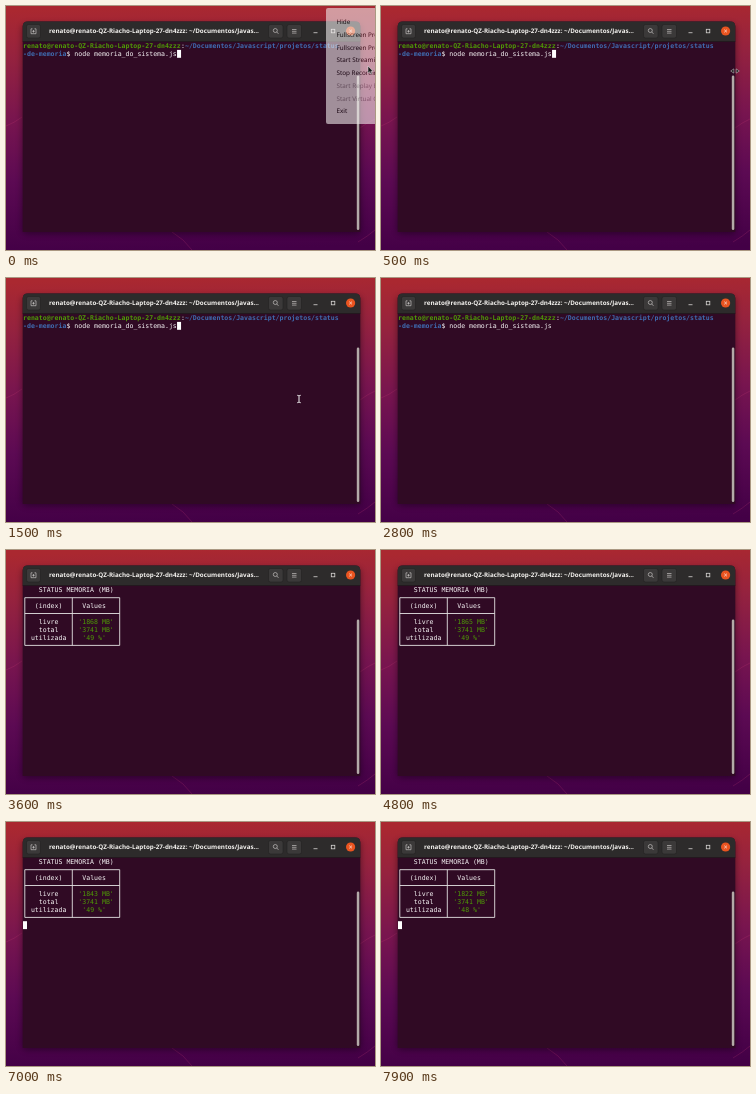
These frames come from a looping animation (369 by 244 pixels, 8000 ms). An HTML page:

```html
<!DOCTYPE html>
<html lang="pt">
<head>
<meta charset="utf-8">
<title>Status da memória</title>
<style>
html, body { margin: 0; width: 100%; height: 100%; overflow: hidden; background: #4a0649; }
svg { display: block; width: 369px; height: 244px; }
text { white-space: pre; text-rendering: geometricPrecision; }
.mono { font: 6.56px "DejaVu Sans Mono", monospace; }
.ui { font-family: "Noto Sans", "Open Sans", sans-serif; }
.b { font-weight: 700; }
</style>
</head>
<body>
<svg viewBox="0 0 369 244">
  <defs>
    <linearGradient id="sky" x1="0.48" y1="0" x2="0.52" y2="1">
      <stop offset="0" stop-color="#aa2830"/>
      <stop offset=".2" stop-color="#94223f"/>
      <stop offset=".45" stop-color="#78154f"/>
      <stop offset=".7" stop-color="#5c0a53"/>
      <stop offset="1" stop-color="#430046"/>
    </linearGradient>
    <filter id="blur" x="-10%" y="-10%" width="120%" height="120%"><feGaussianBlur stdDeviation="3"/></filter>
  </defs>

  <rect width="369" height="244" fill="url(#sky)"/>
  <g fill="none" stroke="#d0407a" stroke-opacity=".2">
    <path d="M0 120Q8 117 16 111M166 226Q178 233 186 244M352 236Q362 230 369 224M354 122Q362 116 369 113"/>
  </g>
  <rect x="16" y="18" width="339" height="210" rx="5" fill="#000" opacity=".38" filter="url(#blur)"/>

  <path d="M16.700 226V20.500q0-5 5-5H349.300q5 0 5 5V226Z" fill="#300a24"/>
  <path d="M16.700 35.500V20.500q0-5 5-5H349.300q5 0 5 5V35.500Z" fill="#2d2b2b"/>
  <path d="M16.700 35.500H354.300" stroke="#1c1918" stroke-width=".6"/>
  <g fill="#3b3939" stroke="#242222" stroke-width=".6">
    <rect x="20.500" y="18.500" width="14" height="13.500" rx="2"/>
    <rect x="262.500" y="18.500" width="14.500" height="13.500" rx="2"/>
    <rect x="281" y="18.500" width="14.500" height="13.500" rx="2"/>
  </g>
  <g fill="none" stroke="#d8d5d3" stroke-width=".6">
    <path d="M26.500 22.800H25V27.700H30V22.800H28.500M27.500 24V26.600M26.200 25.300H28.800"/>
    <circle cx="269.300" cy="24.500" r="2"/><path d="M270.800 26L272.500 27.900"/>
    <path d="M286 23.500H290.500M286 25.300H290.500M286 27.100H290.500"/>
    <path d="M307.500 26.700H311.500" stroke-width=".8"/>
    <rect x="325.300" y="23.300" width="3.500" height="3.500" stroke-width=".8"/>
  </g>
  <circle cx="344.600" cy="25" r="4.600" fill="#e95420"/>
  <path d="M343.200 23.600L346 26.400M346 23.600L343.200 26.400" stroke="#fff" stroke-width=".6"/>
  <text id="title" class="ui b" x="43" y="27.300" font-size="6.260" fill="#f4f2ef"></text>
  <rect x="350.800" y="69.500" width="2.500" height="154.500" rx="1.250" fill="#b3aaa8"/>

  <g id="prompt" class="mono"></g>
  <g id="table" class="mono">
    <path d="M18.800 47.700H113.700V95.400H18.800ZM66.300 47.700V95.400M18.800 63.500H113.700" fill="none" stroke="#e4e2e2" stroke-width=".9"/>
  </g>
  <rect id="caret" width="4" height="7.900" fill="#fff"/>

  <g id="menu" class="ui" font-size="6.300">
    <rect x="320" y="2" width="56" height="116" rx="2" fill="#f3efef"/>
  </g>

  <g id="arrow"><path d="M0 0V7.200L1.700 5.700L2.900 8.200L4 7.700L2.900 5.300H5Z" fill="#151515" stroke="#eee" stroke-width=".5"/></g>
  <g id="resize"><path d="M-4.300 0L-1.200-2.100V2.100ZM4.300 0L1.200-2.100V2.100Z" fill="#151515" stroke="#ddd" stroke-width=".5"/></g>
  <g id="beam"><path d="M-1.700-3.700Q0-3.700 0-2.700Q0-3.700 1.700-3.700M0-2.700V2.700M-1.700 3.700Q0 3.700 0 2.700Q0 3.700 1.700 3.700" fill="none" stroke="#f4f4f4" stroke-width="1"/></g>
</svg>
<script>
const LOOP = 8000, STEP = 100, ENTER = 1800, BLINK = 600;
const COL = 3.95, ROW = 7.9, LEFT = 17;
const GREEN = '#4e9a06', BLUE = '#3f6cb0', WHITE = '#f8f6f7';
const TOTAL = 3741;
const readings = [[2900, 1868], [3900, 1865], [4900, 1862], [5900, 1860], [6900, 1843], [7900, 1822]];
const path = [[0, 362, 60], [200, 362, 60], [500, 354, 65], [800, 334, 88], [1300, 293, 121], [1800, 293, 121]];
const $ = id => document.getElementById(id);

function label(parent, x, y, str, fill, cls = '') {
  const el = document.createElementNS('http://www.w3.org/2000/svg', 'text');
  el.setAttribute('x', x);
  el.setAttribute('y', y);
  el.setAttribute('fill', fill);
  el.setAttribute('class', cls);
  el.textContent = str;
  return parent.appendChild(el);
}
const cell = (parent, col, row, str, fill = WHITE, cls) =>
  label(parent, LEFT + col * COL, 42.4 + row * ROW, str, fill, cls);
const show = (id, on) => $(id).style.display = on ? '' : 'none';

const host = 'renato@renato-QZ-Riacho-Laptop-27-dn4zzz';
$('title').textContent = host + ': ~/Documentos/Javas…';

const prompt = $('prompt'), table = $('table');
cell(prompt, 0, 0, host, GREEN, 'b');
cell(prompt, 40, 0, ':');
cell(prompt, 41, 0, '~/Documentos/Javascript/projetos/status', BLUE, 'b');
cell(prompt, 0, 1, '-de-memoria', BLUE, 'b');
cell(prompt, 11, 1, '$ node memoria_do_sistema.js');

cell(table, 4, 0, 'STATUS MEMORIA (MB)');
cell(table, 3, 2, '(index)');
cell(table, 15, 2, 'Values');
cell(table, 4, 4, 'livre');
cell(table, 4, 5, 'total');
cell(table, 2, 6, 'utilizada');
const free = cell(table, 14, 4, '', GREEN);
cell(table, 14, 5, `'${TOTAL} MB'`, GREEN);
const used = cell(table, 15, 6, '', GREEN);

['Hide', 'Fullscreen Projector', 'Fullscreen Projector', 'Start Streaming', 'Stop Recording',
 'Start Replay Buffer', 'Start Virtual Camera', 'Exit'].forEach((item, i) =>
  label($('menu'), 330.5, 18.3 + i * 12.7, item, i === 5 || i === 6 ? '#8d8489' : '#0c0508'));

function pointer(t) {
  const i = Math.max(1, path.findIndex(p => p[0] > t));
  const [t0, x0, y0] = path[i - 1], [t1, x1, y1] = path[i];
  const k = (t - t0) / (t1 - t0);
  return [x0 + (x1 - x0) * k, y0 + (y1 - y0) * k];
}

function draw(time) {
  const t = Math.floor(time % LOOP / STEP) * STEP;
  const now = readings.filter(r => r[0] <= t).pop();

  show('prompt', !now);
  show('table', now);
  if (now) {
    free.textContent = `'${now[1]} MB'`;
    used.textContent = `'${Math.floor(now[1] / TOTAL * 100)} %'`;
  }

  const typed = t >= ENTER;
  const [col, row] = now ? [0, 8] : typed ? [0, 2] : [39, 1];
  show('caret', Math.floor((typed ? t - ENTER : t) / BLINK) % 2 === 0);
  $('caret').setAttribute('x', LEFT + col * COL);
  $('caret').setAttribute('y', 36 + row * ROW);

  $('menu').setAttribute('opacity', Math.max(0, .58 - t * .0035));

  const [x, y] = typed ? [0, 0] : pointer(t);
  const kind = typed ? '' : x > 357 ? 'arrow' : x > 350 ? 'resize' : 'beam';
  for (const id of ['arrow', 'resize', 'beam']) show(id, id === kind);
  if (kind) $(kind).setAttribute('transform', `translate(${x} ${y})`);
}

const start = performance.now();
function tick() {
  draw(performance.now() - start);
  requestAnimationFrame(tick);
}
tick();
</script>
</body>
</html>
```
